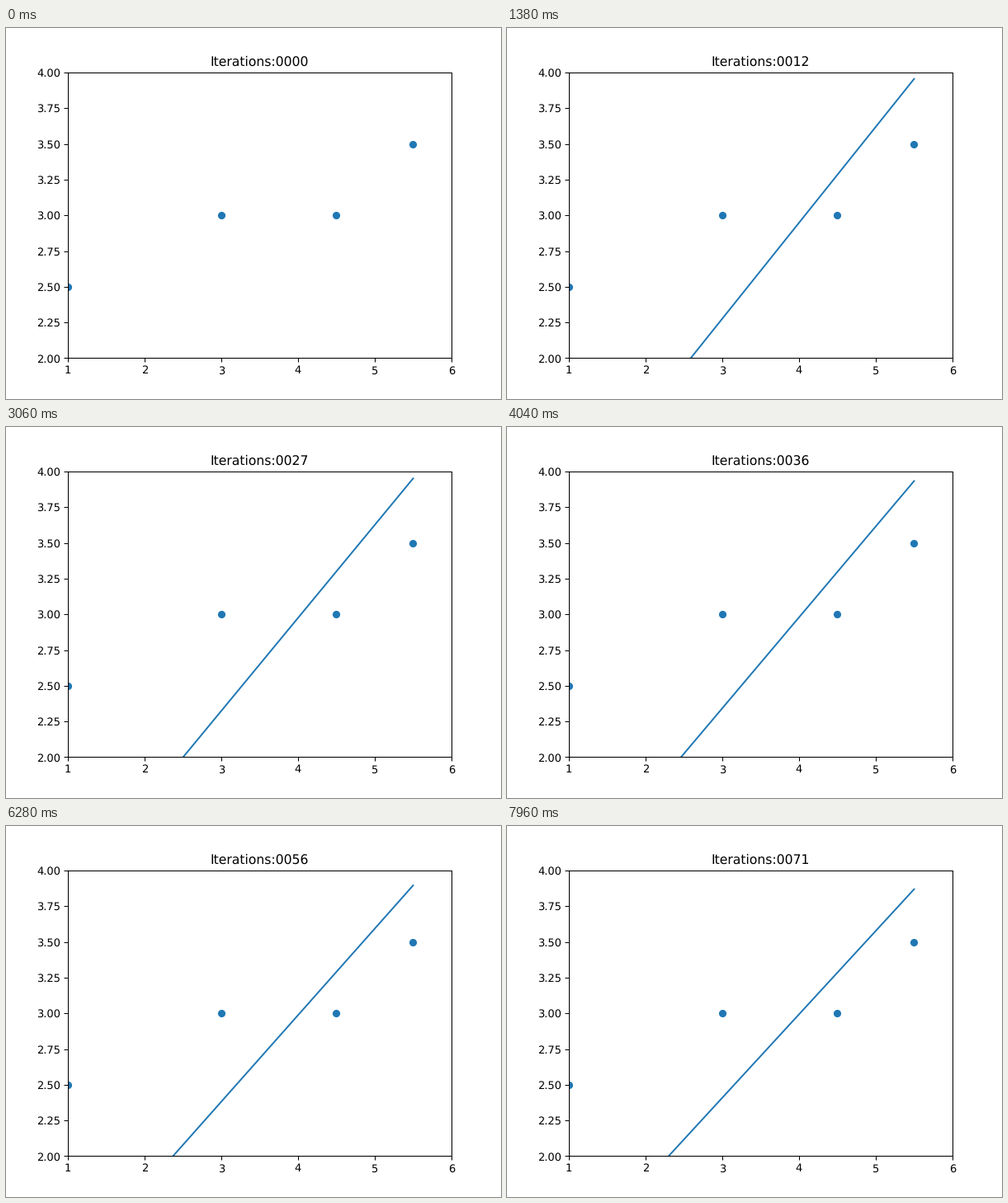
Write a matplotlib script that moves like this. It is 600x450 px and loops after 8000 ms.

```python
import numpy as np
import matplotlib.pyplot as plt
from matplotlib.animation import FuncAnimation

LOOP_MS = 8000
TICK_MS = 20
CYCLE_MS = 560                      # five iterations per cycle
STARTS = [0, 120, 260, 300, 440]    # onset of each iteration in a cycle
RATE = 0.02

x = np.array([1, 3, 4.5, 5.5])
y = np.array([2.5, 3, 3, 3.5])


def iteration_at(ms):
    cycle, rest = divmod(ms, CYCLE_MS)
    return 5 * cycle + sum(rest >= s for s in STARTS) - 1


def descend(steps):
    """Gradient descent for y = w * x + b, starting from zero."""
    w = b = 0.0
    path = []
    for _ in range(steps):
        err = w * x + b - y
        w, b = w - RATE * np.mean(err * x), b - RATE * np.mean(err)
        path.append((w, b))
    return path


fits = descend(iteration_at(LOOP_MS) + 1)

plt.rcParams["text.hinting"] = "none"
fig, ax = plt.subplots(figsize=(6.4, 4.8), dpi=93.75)
# Keep edges and markers just off half pixels so they snap left and up.
fig.subplots_adjust(left=0.1249, right=0.8999, bottom=0.1101, top=0.88)
ax.scatter(x, y, color="C0")
line, = ax.plot([], [], color="C0")
title = ax.set_title("")
ax.set_xlim(1, 6)
ax.set_ylim(2, 4)


def update(i):
    n = iteration_at(i * TICK_MS)
    w, b = fits[n]
    line.set_data(x, w * x + b)
    title.set_text(f"Iterations:{n:04d}")
    return line, title


anim = FuncAnimation(fig, update, frames=LOOP_MS // TICK_MS,
                     interval=TICK_MS, repeat=True, repeat_delay=0)
plt.show()
```
